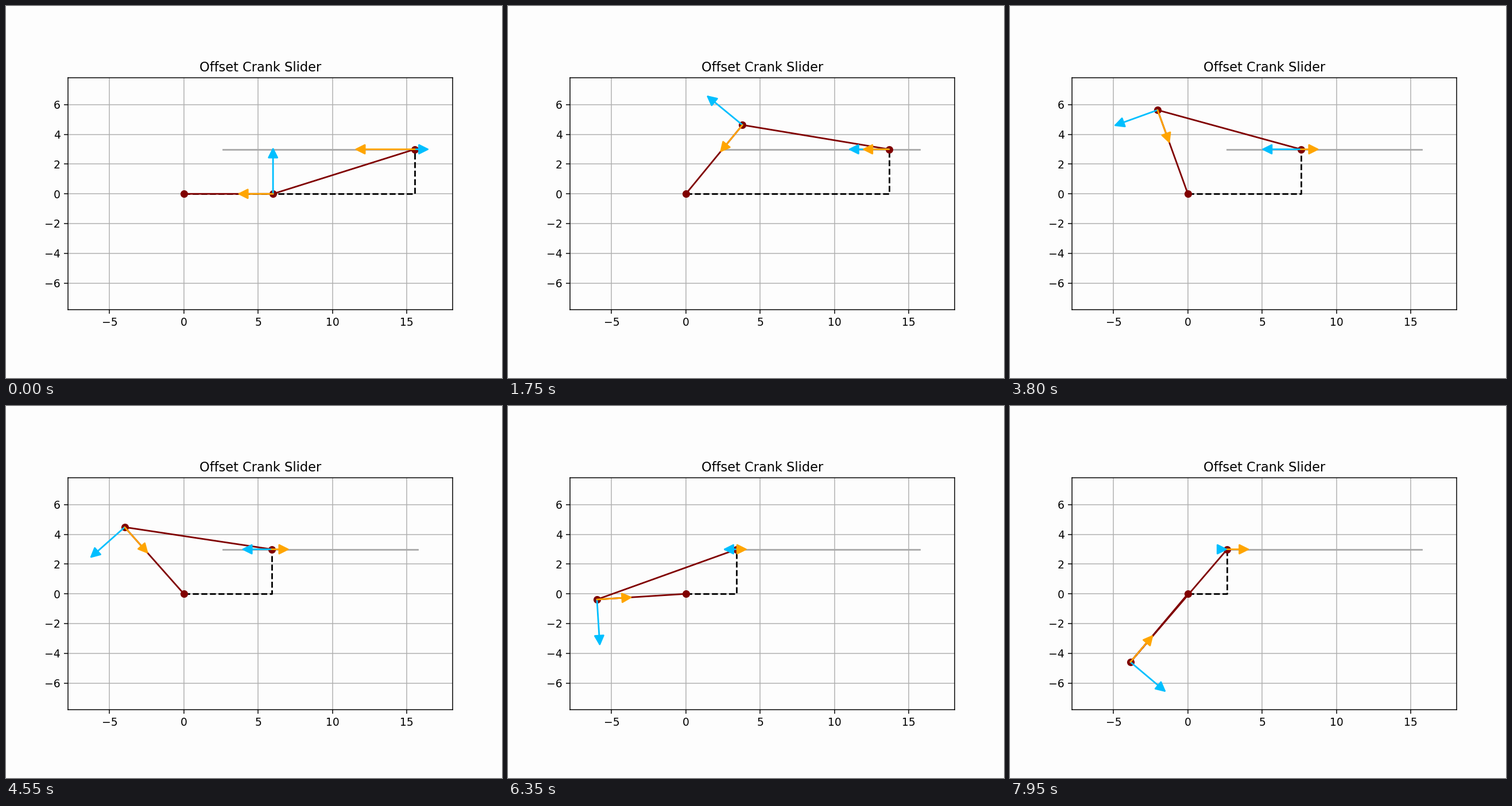
These frames come from a looping animation (864 by 648 pixels, 8 s). A matplotlib script:

```python
import numpy as np
import matplotlib.pyplot as plt
from matplotlib.animation import FuncAnimation
from matplotlib.patches import FancyArrowPatch

CRANK, ROD, OFFSET = 6.0, 10.0, 3.0
FRAMES, INTERVAL = 160, 50
STEP = 2 * np.pi / 249
VEL_SCALE, ACC_SCALE = np.pi / 6, 0.4
PAPER = "#fdfdfd"

plt.rcParams["font.family"] = "DejaVu Sans"

reach = np.sqrt((ROD + CRANK) ** 2 - OFFSET ** 2)
near = np.sqrt((ROD - CRANK) ** 2 - OFFSET ** 2)

fig, ax = plt.subplots(figsize=(6.4, 4.8), dpi=135, facecolor=PAPER)
fig.subplots_adjust(left=0.125, right=0.9, bottom=0.11, top=0.88)
ax.set_facecolor(PAPER)
ax.set_aspect("equal")
ax.set_xlim(-1.3 * CRANK, 1.15 * reach)
ax.set_ylim(-1.3 * CRANK, 1.3 * CRANK)
ax.set_xticks(range(-5, 16, 5))
ax.set_yticks(range(-6, 7, 2))
ax.set_title("Offset Crank Slider")
ax.grid(True)

ax.plot([near, reach], [OFFSET, OFFSET], color="darkgray", lw=1.5)
(guide,) = ax.plot([], [], "--", color="black", lw=1.5)
(links,) = ax.plot([], [], "o-", color="maroon", lw=1.5, ms=6)


def make_arrow(color, zorder):
    arrow = FancyArrowPatch((0, 0), (1, 0), arrowstyle="-|>", mutation_scale=20,
                            color=color, lw=1.5, shrinkA=0, shrinkB=0,
                            zorder=zorder)
    return ax.add_patch(arrow)


crank_vel, slider_vel = (make_arrow("deepskyblue", 3) for _ in range(2))
crank_acc, slider_acc = (make_arrow("orange", 4) for _ in range(2))


def point(arrow, start, vector):
    arrow.set_positions(start, (start[0] + vector[0], start[1] + vector[1]))


def update(i):
    theta = i * STEP
    x, y = CRANK * np.cos(theta), CRANK * np.sin(theta)
    rise = OFFSET - y
    span = np.sqrt(ROD ** 2 - rise ** 2)
    slider = (x + span, OFFSET)

    # slider derivatives with respect to the crank angle
    vel = -y + rise * x / span
    acc = -x - (x ** 2 + rise * y) / span - (rise * x) ** 2 / span ** 3

    links.set_data([0, x, slider[0]], [0, y, OFFSET])
    guide.set_data([0, slider[0], slider[0]], [0, 0, OFFSET])
    point(crank_vel, (x, y), (-y * VEL_SCALE, x * VEL_SCALE))
    point(crank_acc, (x, y), (-x * ACC_SCALE, -y * ACC_SCALE))
    point(slider_vel, slider, (vel * VEL_SCALE, 0))
    point(slider_acc, slider, (acc * ACC_SCALE, 0))
    return guide, links, crank_vel, slider_vel, crank_acc, slider_acc


anim = FuncAnimation(fig, update, frames=FRAMES, init_func=lambda: update(0),
                     interval=INTERVAL, repeat=True, repeat_delay=0, blit=False)
plt.show()
```
